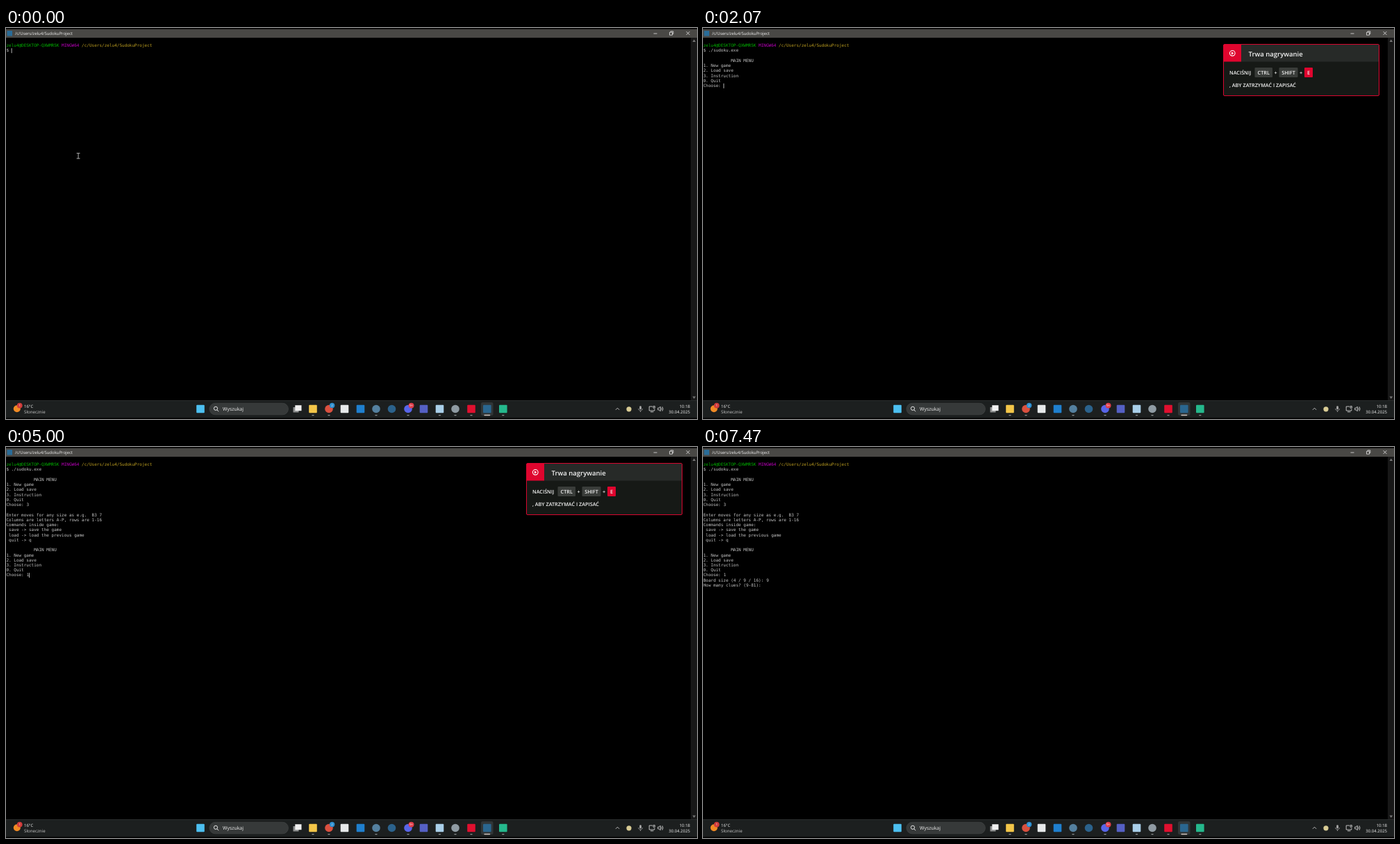
Recreate the animation shown at these times as an HTML page. Size 995 px wide and 563 px high, loop 8000 ms.

```html
<!DOCTYPE html>
<html lang="pl">
<head>
<meta charset="utf-8">
<style>
  html, body { margin: 0; width: 100%; height: 100%; overflow: hidden; background: #000; }
  svg { display: block; width: 995px; height: 563px; }
  text { font: 6px "Open Sans", "Noto Sans", sans-serif; fill: #f2f2f2; white-space: pre; text-rendering: geometricPrecision; }
  .term text { font: 6.03px "DejaVu Sans Mono", monospace; fill: #c4c4c4; }
  .toast text { font-size: 7.25px; font-weight: 600; text-anchor: middle; }
  .toast .left { text-anchor: start; }
  .badge { font-size: 4.5px; text-anchor: middle; }
  .line { fill: none; stroke: #e4e4e4; stroke-width: .8; }
</style>
</head>
<body>
<svg viewBox="0 0 995 563">
  <rect width="995" height="563"/>

  <!-- title bar -->
  <rect y="1.6" width="995" height="12.4" fill="#494845"/>
  <rect x="1.5" y="4" width="7.5" height="7.5" fill="#2a6c98"/>
  <text x="13" y="10">/c/Users/zelu4/SudokuProject</text>
  <path class="line" d="M932.5 8h5M955.5 6.2h4v4h-4zM957 6V4.8h3.8v3.8h-1.2M979.5 5l5 5m0-5l-5 5"/>

  <!-- scrollbar -->
  <rect x="986" y="14" width="9" height="522" fill="#171717"/>
  <path d="M988.5 20l2.3-3.6 2.3 3.6zM988.5 530.5l2.3 3.6 2.3-3.6z" fill="#777"/>

  <g class="term" id="term">
    <text x=".4" y="27.2"><tspan fill="#00b400">zelu4@DESKTOP-QXWMR5K</tspan><tspan fill="#bf00bf"> MINGW64</tspan><tspan fill="#bfa020"> /c/Users/zelu4/SudokuProject</tspan></text>
    <rect id="caret" width=".9" height="7" fill="#c4c4c4"/>
  </g>

  <path id="pointer" d="M101.7 180.3h4.8M104.1 180.3v7.6M101.7 187.9h4.8" fill="none" stroke="#b0b0b0"/>

  <g class="toast" id="toast">
    <rect x="749.5" y="23.5" width="224" height="74" rx="1.5" fill="#161916" stroke="#d8062f"/>
    <rect x="775" y="24" width="198" height="24.5" fill="#272a28"/>
    <rect x="750" y="24" width="25" height="24.5" fill="#df052e"/>
    <circle class="line" cx="762.3" cy="36.3" r="3.8" style="stroke:#fff;stroke-width:1.1"/>
    <path d="M761 34.2l3.2 2.1-3.2 2.1z" fill="#fff"/>
    <text class="left" x="785.5" y="40.6" style="font-size:9.5px">Trwa nagrywanie</text>
    <text class="left" x="758" y="66.8">NACIŚNIJ</text>
    <rect x="794.5" y="57" width="25.5" height="14" rx="1" fill="#3a3d3a"/>
    <rect x="829.5" y="57" width="27" height="14" rx="1" fill="#3a3d3a"/>
    <rect x="866" y="57" width="12" height="14" rx="1" fill="#df052e"/>
    <text x="807.2" y="66.8">CTRL</text>
    <text x="824.6" y="66.8">+</text>
    <text x="843" y="66.8">SHIFT</text>
    <text x="861" y="66.8">+</text>
    <text x="872" y="66.8">E</text>
    <text class="left" x="758" y="85.2">, ABY ZATRZYMAĆ I ZAPISAĆ</text>
  </g>

  <!-- taskbar -->
  <rect y="536" width="995" height="25.4" fill="#1c1f1f"/>
  <rect y="536" width="995" height=".6" fill="#343737"/>
  <circle cx="15.8" cy="548.2" r="5" fill="#f08a24"/>
  <circle cx="19.7" cy="543.6" r="3.9" fill="#d13b3b"/>
  <text class="badge" x="19.7" y="545.2">1</text>
  <text x="26" y="546.5">16°C</text>
  <text x="26" y="554.8" style="font-size:6.2px;fill:#c8c8c8">Słonecznie</text>
  <rect x="293" y="540.3" width="113.5" height="16.5" rx="8.2" fill="#363939" stroke="#454848" stroke-width=".6"/>
  <path class="line" d="M303.8 549.8l2.4 2.4" style="stroke-width:1"/>
  <circle class="line" cx="302" cy="547.8" r="2.6" style="stroke-width:1"/>
  <text x="312" y="551" style="font-size:6.95px">Wyszukaj</text>
  <rect x="684" y="539" width="17.5" height="19" rx="2" fill="#313637"/>
  <g id="apps"></g>
  <path d="M413.5 546h8v7.5h-8z" fill="#8d8f8f"/>
  <path d="M416.3 543.2h9.2v8h-9.2z" fill="#f0f0f0"/>
  <circle cx="469.6" cy="543.5" r="3.7" fill="#2d8fd0"/>
  <text class="badge" x="469.6" y="545.1">2</text>
  <circle cx="583.6" cy="543.6" r="3.9" fill="#e03c48"/>
  <text class="badge" x="583.6" y="545.2">9+</text>

  <!-- tray -->
  <path class="line" d="M877.9 549.8l2.6-2.6 2.6 2.6"/>
  <circle cx="897" cy="548.8" r="3.6" fill="#d8cb94"/>
  <rect x="912.2" y="544.3" width="2.8" height="5.2" rx="1.4" fill="#a8a8a8"/>
  <path class="line" d="M910.8 548c0 4 5.6 4 5.6 0M913.6 551v2" style="stroke:#a8a8a8"/>
  <path class="line" d="M931 545h-4.8v6h7.6v-2.4M928 552.8h4.4M932 544.6h2.3v2.6H932z"/>
  <path class="line" d="M938.7 547.2h1.5l2-2v6.6l-2-2h-1.5zM943.6 546.8q1.2 1.7 0 3.4M945 545.4q2.2 3.1 0 6.2"/>
  <text x="985" y="546.6" text-anchor="end">10:18</text>
  <text x="985" y="554.8" text-anchor="end">30.04.2025</text>
</svg>
<script>
const LOOP = 8000, COL = 3.63, ROW = 7.24, LEFT = 0.4;
const $ = id => document.getElementById(id);

function add(parent, tag, attrs) {
  const node = document.createElementNS("http://www.w3.org/2000/svg", tag);
  for (const key in attrs) node.setAttribute(key, attrs[key]);
  return parent.appendChild(node);
}

// Taskbar icons: centre x, colour, round?, running?
for (const [x, fill, round, running] of [
  [280, "#4cbff0", 0, 0], [442, "#f3c648", 0, 1], [465, "#d9503f", 1, 1],
  [487.5, "#e6e9ea", 0, 0], [510.5, "#1f7fce", 0, 0], [533, "#54809f", 1, 1],
  [555.5, "#2b628c", 1, 0], [579, "#5865e8", 1, 1], [601.5, "#5560c4", 0, 0],
  [624.5, "#a9cfe9", 0, 1], [647, "#8f9ba3", 1, 1], [670, "#e0102f", 0, 1],
  [692.8, "#2a668f", 0, 0], [715.8, "#25b88c", 0, 1]
]) {
  add($("apps"), "rect", { x: x - 5.8, y: 542.7, width: 11.6, height: 11.6, rx: round ? 5.8 : 1, fill });
  if (running) add($("apps"), "rect", { x: x - 1.7, y: 557, width: 3.4, height: 1.2, rx: .6, fill: "#8f9292" });
}
add($("apps"), "rect", { x: 688.3, y: 556.8, width: 9, height: 1.4, rx: .7, fill: "#d5c9c4" });

// Terminal output: time, row, column, text
const output = [[0, 1, 0, "$"], [1470, 1, 2, "./sudoku.exe"]];
const print = (time, row, lines) => lines.forEach((text, i) => output.push([time, row + i, 0, text]));
const menu = [" ".repeat(11) + "MAIN MENU", "1. New game", "2. Load save", "3. Instruction", "0. Quit", "Choose:"];
print(2000, 3, menu);
output.push([3400, 8, 8, "3"]);
print(3670, 10, [
  "Enter moves for any size as e.g.  B3 7",
  "Columns are letters A-P, rows are 1-16",
  "Commands inside game:",
  " save -> save the game",
  " load -> load the previous game",
  " quit -> q",
  "", ...menu
]);
output.push([4870, 22, 8, "1"]);
print(5400, 23, ["Board size (4 / 9 / 16):"]);
output.push([6600, 23, 25, "9"]);
print(6930, 24, ["How many clues? (9-81):"]);

const pieces = output.map(([time, row, col, text]) => {
  const node = add($("term"), "text", { x: LEFT + col * COL, y: 27.2 + row * ROW });
  node.textContent = text;
  return { time, node };
});

// Caret blinks: from, to, row, column
const blinks = [
  [0, 200, 1, 2], [730, 1200, 1, 2], [1470, 2000, 1, 14],
  [2000, 2530, 8, 8], [3070, 3400, 8, 8], [3400, 3670, 8, 9],
  [3670, 4200, 22, 8], [4730, 4870, 22, 8], [4870, 5400, 22, 9],
  [5400, 5930, 23, 25], [6470, 6600, 23, 25], [6600, 6930, 23, 26],
  [6930, 7470, 24, 24]
];

const clamp = v => Math.max(0, Math.min(1, v));
const show = (node, on) => node.setAttribute("visibility", on ? "visible" : "hidden");

function draw(now) {
  const t = now % LOOP;
  for (const { time, node } of pieces) show(node, t >= time);

  const blink = blinks.find(([from, to]) => t >= from && t < to);
  show($("caret"), blink);
  if (blink) {
    $("caret").setAttribute("x", LEFT + blink[3] * COL);
    $("caret").setAttribute("y", 21.9 + blink[2] * ROW);
  }

  show($("pointer"), t < 730);
  $("toast").setAttribute("opacity", Math.min(clamp((t - 40) / 150), clamp((5130 - t) / 70)));
  requestAnimationFrame(draw);
}
requestAnimationFrame(draw);
</script>
</body>
</html>
```
